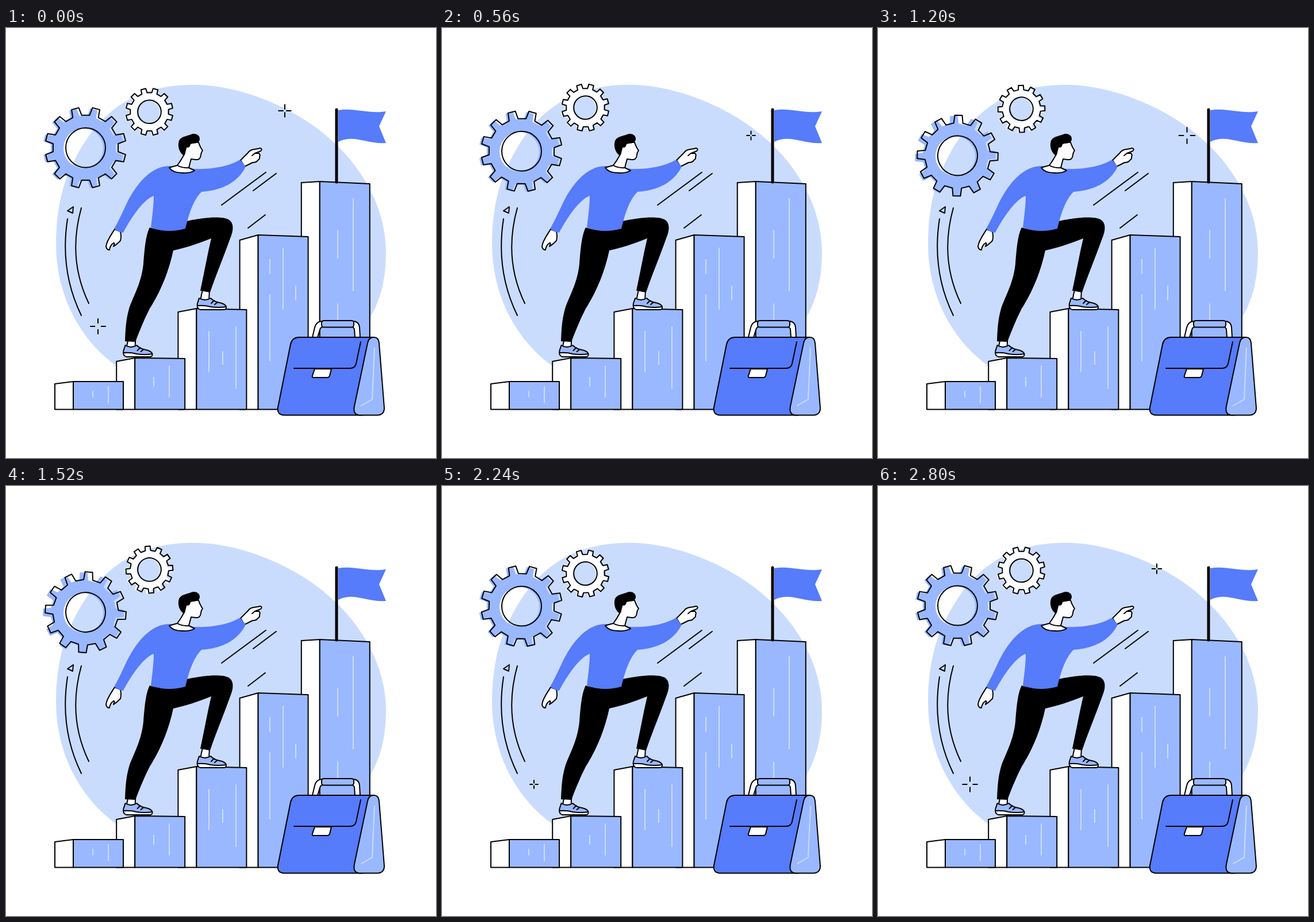
An HTML page for the animation above (2880 ms loop, 748 px wide and 748 px high).

```html
<!DOCTYPE html>
<html>
<head>
<meta charset="utf-8">
<style>
html, body { margin: 0; width: 100%; height: 100%; overflow: hidden; background: #fff; }
svg { display: block; width: 100vw; height: 100vh; }
.ink { stroke: #000; stroke-width: 2; stroke-linecap: round; stroke-linejoin: round; }
.line { fill: none; }
.white { fill: #fff; }
.pale { fill: #cadcfe; }
.mid { fill: #9ab8ff; }
.blue { fill: #567bfb; }
.shine { fill: none; stroke: #cadcfe; stroke-width: 2; stroke-linecap: round; }
</style>
</head>
<body>
<svg viewBox="0 0 748 748">
  <path class="pale" d="M318 99C400 96 500 137 560 190C625 245 661 320 661 390C661 440 650 475 634 503V600H200L192 588C125 540 87 460 87 375C87 330 95 280 112 245C150 160 210 101 318 99Z"/>

  <g id="gears"></g>

  <path class="ink line" d="M107 332C98 390 104 445 131 500M131 313C115 370 118 425 144 479M107 318L117 311L116 322ZM375 308L452 251M430 283L470 253M421 348L451 325"/>

  <g id="bars"></g>
  <path class="shine" d="M151 632V642M178 624V652M257 608V623M284 588V642M353 528V598M377 563V585M400 520V627M459 403V427M482 383V489M459 464V579M504 449V473M604 297V457M577 352V400M577 480V520"/>

  <!-- flag -->
  <path class="blue" d="M578 143C605 138 630 150 661 145L649 171L661 200C630 203 605 184 578 198Z"/>
  <path d="M575 142V268" stroke="#000" stroke-width="5" stroke-linecap="round"/>

  <!-- briefcase -->
  <path class="ink white" d="M533 538L537 521Q540 510 550 510H603Q614 510 615 521L616 538H607L606 524Q605 520 600 520H552Q547 520 546 525L542 538Z"/>
  <rect class="ink mid" x="549" y="509" width="56" height="11.500" rx="4"/>
  <path class="ink blue" d="M510 538H640L620 673.500H484Q471 673 473 660L495 550Q498 538 510 538Z"/>
  <path class="ink mid" d="M640 538Q631 538 629 548L606 658Q603 673.500 616 673.500H646Q658 673 658 661L649 548Q648 538 640 538Z"/>
  <path class="ink line" d="M617 546L609 584Q607 592 598 592H501"/>
  <path class="ink white" d="M537 593H566L563 605Q562 608 559 608H535Q532 608 533 605Z"/>
  <path class="shine" d="M641 557L637 646L618 657"/>

  <!-- climber -->
  <defs>
    <g id="foot">
      <path class="ink white" d="M342 455L338 474H353L354 455Z"/>
      <path class="ink mid" d="M336 470Q346 476 356 470Q362 476 370 477.500Q383 480 383 486Q383 490 378 490H338Q331 488 333 479Z"/>
      <path class="white" d="M333.500 484Q346 482 356 485Q370 487 382 485Q383 489 378 489H337Z"/>
      <path class="ink line" d="M333 483Q346 482 356 485Q370 487 383 485M357 479L362 474M363 481L368 477"/>
    </g>
  </defs>
  <use href="#foot"/>
  <use href="#foot" x="-128.500" y="82"/>
  <path d="M250 347Q282 357 312 346L314 336C345 329 375 327 387 333C397 339 396 352 390 366C378 400 365 430 355 460L338 457C345 425 350 395 357 366C335 375 310 383 291 387C283 425 268 460 250 488C240 508 233 525 225 546L207 545C208 520 209 505 215 485C225 460 236 440 239 410C241 385 243 360 250 347Z"/>
  <path class="ink white" d="M189 350C183 360 175 370 174 380Q175 386 180 386Q181 378 187 374Q190 373 187 380Q192 377 199 370Q201 363 199 354Z"/>
  <path class="ink white" d="M408 230L421 217C425 210 433 212 442 209Q447 211 443 214L433 218L440 218Q443 221 441 224Q442 228 438 230Q436 234 429 234L415 241Z"/>
  <path class="ink line" d="M433 218L428 222"/>
  <path class="blue" d="M285 240C250 240 225 275 211 303C202 322 195 338 188 349Q195 355 204 356C213 338 238 298 257 292C257 310 254 330 252 347Q280 358 312 349C318 325 325 300 340 285C370 283 402 272 417 241L407 229C385 243 350 246 328 245Z"/>
  <path class="ink white" d="M310 220Q304 231 298 239Q290 241 284 243Q290 252 306 252Q320 253 328 248L318 243L322 228L330 229Q338 230 339 221Q339 217 342 213Q338 208 335 199L316 198Z"/>
  <path class="ink line" d="M298 239Q307 244 318 243"/>
  <path d="M309 222C301 216 298 205 301 196C305 188 316 188 322 185C330 182 338 187 337 194Q336 201 325 201L321 202Q320 208 316 208Q311 207 312 213Q313 219 309 222Z"/>

  <path id="sparks" class="ink line"/>
</svg>
<script>
const LOOP = 2880, STEP = 80, BASE = 663.5;
const $ = id => document.getElementById(id);

function add(parent, tag, attrs) {
  const el = document.createElementNS('http://www.w3.org/2000/svg', tag);
  for (const k in attrs) el.setAttribute(k, attrs[k]);
  return parent.appendChild(el);
}

// the tallest bar lies at the back
const tops = [615, 574, 488, 360, 267], slant = [4, 6, 6, 9, 2];
for (let i = tops.length - 1; i >= 0; i--) {
  const x = 85 + 107.2 * i, front = x + 32, right = x + 119, y = tops[i];
  add($('bars'), 'path', { class: 'ink white', d: `M${x} ${y + slant[i]}L${front} ${y}V${BASE}H${x}Z` });
  add($('bars'), 'path', { class: 'ink mid', d: `M${front} ${y}L${right} ${y + i}V${BASE}H${front}Z` });
}

function gearPath(root, tip, hole, base, top) {
  let d = '';
  for (let i = 0; i < 12; i++) {
    for (const [r, off] of [[root, -base], [tip, -top], [tip, top], [root, base]]) {
      const a = (15 + 30 * i + off) * Math.PI / 180;
      d += (d ? 'L' : 'M') + (r * Math.sin(a)).toFixed(2) + ' ' + (-r * Math.cos(a)).toFixed(2);
    }
  }
  const arc = `a${hole} ${hole} 0 1 0 `;
  return d + `ZM${-hole} 0${arc}${2 * hole} 0${arc}${-2 * hole} 0Z`;
}

function makeGear(x, d, fill, shift) {
  const back = add($('gears'), 'path', { class: fill, d, 'fill-rule': 'evenodd' });
  const front = add($('gears'), 'path', { class: 'ink line', d });
  return (y, turn) => {
    // the fill lags a little behind its outline
    back.setAttribute('transform', `translate(${x - shift} ${y + 1}) rotate(${turn * 0.8})`);
    front.setAttribute('transform', `translate(${x} ${y}) rotate(${turn})`);
  };
}

const bigGear = makeGear(138.5, gearPath(57, 70.5, 34.5, 8, 5.3), 'mid', 4);
const smallGear = makeGear(249.5, gearPath(33.5, 41, 20.3, 8, 6), 'white', 2);

// 0..1..0 once per loop, highest at the given time
const wave = (t, peak) => (1 + Math.cos(2 * Math.PI * (t - peak) / LOOP)) / 2;

const sparks = [
  { x: 485, y: 144, start: 2720, life: 720, reach: 16 },
  { x: 160, y: 519, start: 2160, life: 880, reach: 13 },
  { x: 537.5, y: 187, start: 480, life: 800, reach: 14 }
];

function sparkPath({ x, y, start, life, reach }, t) {
  const p = ((t - start + LOOP) % LOOP) / life;
  if (p >= 1) return '';
  const r = 5 + (reach - 5) * (1 - (1 - p) ** 3), gap = 2 + 4.5 * p;
  return [[1, 0], [-1, 0], [0, 1], [0, -1]].map(([u, v]) =>
    `M${x + u * gap} ${y + v * gap}L${x + u * r} ${y + v * r}`).join('');
}

function draw(t) {
  const turn = 20 * wave(t, 1440) ** 3;
  bigGear(208 + 14 * wave(t, 1200) ** 1.5, turn);
  smallGear(152.3 - 14.6 * wave(t, 770), -turn);
  $('sparks').setAttribute('d', sparks.map(s => sparkPath(s, t)).join(''));
}

const begin = performance.now();
function tick() {
  const t = (performance.now() - begin) % LOOP;
  draw(Math.floor(t / STEP) * STEP);
  requestAnimationFrame(tick);
}
draw(0);
requestAnimationFrame(tick);
</script>
</body>
</html>
```
